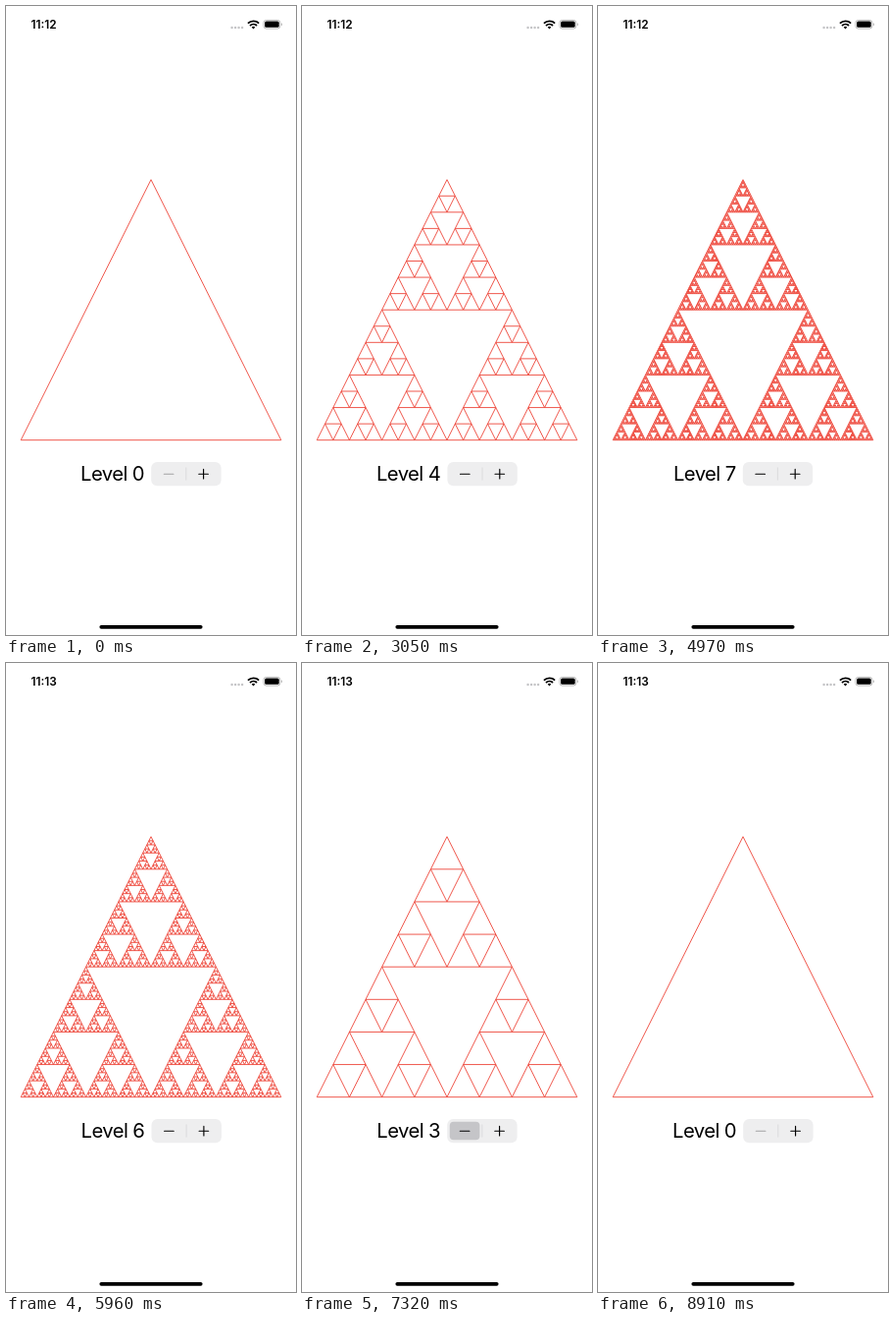
Recreate the animation shown at these times as an HTML page. Size 296 px wide and 640 px high, loop 9.02 s.

```html
<!DOCTYPE html>
<html lang="en">
<head>
<meta charset="utf-8">
<title>Triangle levels</title>
<style>
  html, body { margin: 0; width: 100%; height: 100%; overflow: hidden; background: #fff; }
  svg { display: block; width: 296px; height: 640px; }
  text { font-family: Inter, "Liberation Sans", sans-serif; }
  #clock { font-size: 11.8px; font-weight: 600; }
  #label { font-size: 20.3px; letter-spacing: -0.6px; text-anchor: end; }
  #fractal { fill: none; stroke: #ec3a2d; stroke-width: 0.85; }
  .sign { stroke: #000; stroke-width: 1.15; stroke-linecap: round; }
  .key { fill: #c5c5c8; }
</style>
</head>
<body>
<svg viewBox="0 0 296 640">
  <text id="clock" x="25.6" y="23">11:12</text>

  <g fill="#c4c4c6">
    <circle cx="230.6" cy="22" r="1.2"/>
    <circle cx="234.1" cy="22" r="1.2"/>
    <circle cx="237.6" cy="22" r="1.2"/>
    <circle cx="241.1" cy="22" r="1.2"/>
  </g>
  <g fill="none" stroke="#000" stroke-width="1.8">
    <path d="M246.9 17.6a8 8 0 0 1 11.2 0"/>
    <path d="M249 20a5 5 0 0 1 7 0"/>
  </g>
  <path d="M250.7 21.5a2.6 2.6 0 0 1 3.6 0l-1.8 1.9z"/>
  <rect x="262.9" y="14.4" width="17" height="8.6" rx="2.7" fill="none" stroke="#a8a8a8" stroke-width="0.8"/>
  <rect x="264.1" y="15.6" width="14.6" height="6.2" rx="1.6"/>
  <path d="M280.9 17.2a1.7 1.7 0 0 1 0 3z" fill="#a8a8a8"/>

  <path id="fractal"/>

  <g id="row">
    <text id="label" x="141" y="483.4">Level 0</text>
    <rect x="148.2" y="464" width="71.4" height="24.2" rx="6" fill="#eeeeef"/>
    <path d="M183.8 469.5v13" stroke="#d6d6d8" stroke-width="0.8"/>
    <rect id="minusKey" class="key" x="150.8" y="466.7" width="30.6" height="18.6" rx="4"/>
    <rect id="plusKey" class="key" x="186.2" y="466.7" width="30.6" height="18.6" rx="4"/>
    <path id="minus" class="sign" d="M161.3 476.2h9.6"/>
    <path class="sign" d="M196.8 476.2h9.6M201.6 471.4v9.6"/>
  </g>

  <rect x="95.4" y="630" width="105.2" height="3.7" rx="1.85"/>
</svg>
<script>
  const LOOP = 9020, CLOCK_TICK = 5470;

  // [press time, release time, level, half-faded highlight in between]
  const taps = [
    [1320, 1530, 1, 1], [1720, 1950, 2, 1], [2330, 2440, 3, 0], [2820, 3050, 4, 1],
    [3440, 3660, 5, 1], [4030, 4140, 6, 0], [4780, 4970, 7, 0],
    [5850, 5960, 6, 0], [6410, 6620, 5, 1], [6840, 7060, 4, 1], [7320, 7530, 3, 1],
    [7770, 7980, 2, 1], [8240, 8450, 1, 1], [8700, 8910, 0, 1]
  ];
  // The centred row moves a little with the digit's width.
  const rowShift = [0, -1.3, 0, 0, 0.2, 0, 0.3, -0.4];

  const $ = id => document.getElementById(id);

  function triangles(x, y, w, h, depth) {
    if (!depth) return `M${x} ${y}l${w / 2} ${h}h${-w}z`;
    const half = [w / 2, h / 2, depth - 1];
    return triangles(x, y, ...half) +
      triangles(x - w / 4, y + h / 2, ...half) +
      triangles(x + w / 4, y + h / 2, ...half);
  }
  const paths = rowShift.map((_, n) => triangles(148, 176.7, 265.6, 265, n));

  function highlight(t, [press, release, , fades]) {
    if (t >= release) return 0;
    return fades && t >= press + 100 ? 0.5 : 1;
  }

  let shown = -1;
  function draw(t) {
    const i = taps.findLastIndex(tap => t >= tap[0]);
    const level = i < 0 ? 0 : taps[i][2];
    const before = i < 1 ? 0 : taps[i - 1][2];
    const glow = i < 0 ? 0 : highlight(t, taps[i]);

    if (level !== shown) {
      shown = level;
      $('fractal').setAttribute('d', paths[level]);
      $('label').textContent = 'Level ' + level;
      $('row').setAttribute('transform', `translate(${rowShift[level]} 0)`);
      $('minus').style.stroke = level ? '#000' : '#a2a2a4';
    }
    $('plusKey').style.opacity = level > before ? glow : 0;
    $('minusKey').style.opacity = level < before ? glow : 0;
    $('clock').textContent = t < CLOCK_TICK ? '11:12' : '11:13';
  }

  function frame() {
    draw(performance.now() % LOOP);
    requestAnimationFrame(frame);
  }
  frame();
</script>
</body>
</html>
```
